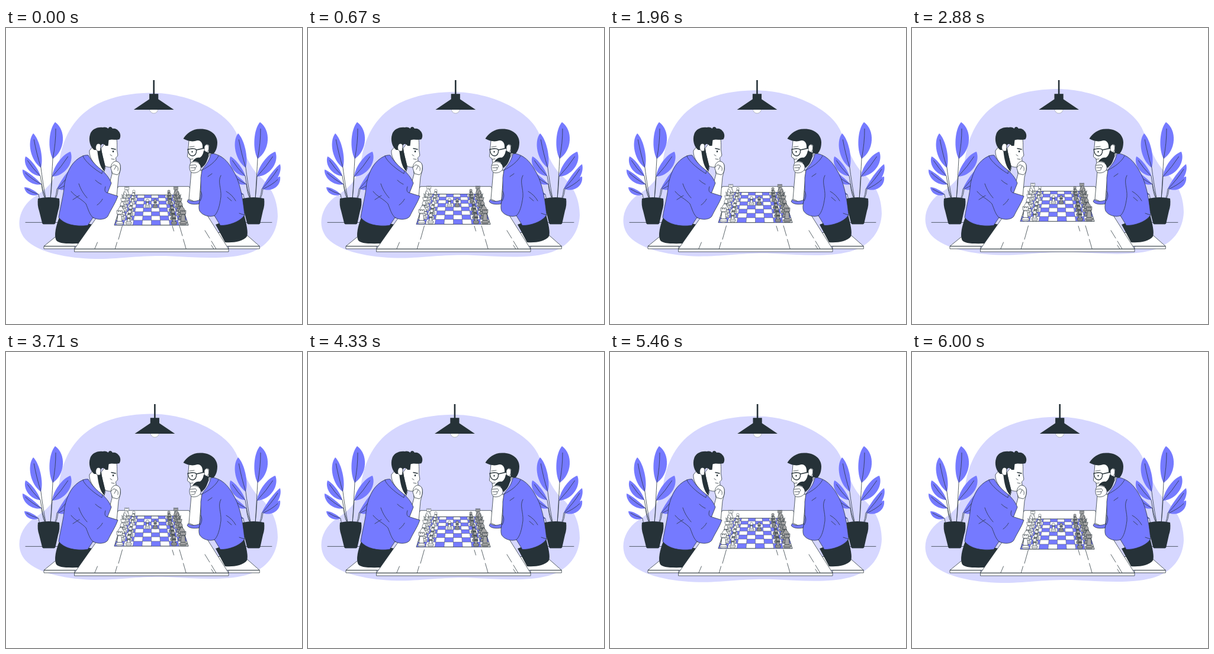
An HTML page for the animation above (6.04 s loop, 500x500 px).

```html
<!DOCTYPE html>
<html lang="en">
<head>
<meta charset="utf-8">
<title>Chess game</title>
<style>
  html, body { margin: 0; width: 100%; height: 100%; overflow: hidden; background: #fff; }
  svg { display: block; width: 100vw; height: 100vh; }
  .line { fill: none; stroke: #263238; stroke-width: .75; stroke-linecap: round; stroke-linejoin: round; }
  .skin { fill: #fff; stroke: #263238; stroke-width: .75; stroke-linejoin: round; }
  .blue { fill: #757aff; stroke: #263238; stroke-width: .75; stroke-linejoin: round; }
  .leaf { fill: #757aff; }
  .dark { fill: #263238; }
  .blob { fill: #d6d7ff; }
  .piece { stroke: #263238; stroke-width: .6; stroke-linejoin: round; }
</style>
</head>
<body>
<svg viewBox="0 0 500 500">
  <path id="blob" class="blob" d="M243 109.5C310 109 372 142 388 175C402 205 408 232 430 252C448 268 459 290 459 318C458 345 442 372 405 382C365 392 320 387 270 385C225 384 195 390 150 390C105 389 55 380 33 357C14 336 22 303 47 286C72 270 84 258 90 225C97 180 118 147 155 128C182 115 212 110 243 109.5Z"/>
  <path class="line" d="M33 328.4H90M400 328.4H449"/>
  <g id="plants"></g>

  <g id="lamp">
    <path d="M242.6 137a7.1 7.1 0 0 0 14.2 0Z" fill="#fff" stroke="#8b9296" stroke-width=".6"/>
    <path class="dark" d="M248.4 88h2.6v23.2h6.3v9L283.6 138H215.8L242.1 120.2v-9h6.3Z"/>
  </g>

  <g id="benches">
    <path class="skin" d="M64 368.6L93 345H150V368.6ZM64 368.6H116V373H64Z"/>
    <path class="skin" d="M428.3 368.6L402 345.5H345V368.6ZM376 368.6H428.3V373H376Z"/>
  </g>
  <path class="dark" d="M90 320C84 335 81 350 84.500 358C88 364 100 364.500 124 364L146 332Z"/>
  <path class="dark" d="M354 332L402 315C406 330 409.500 345 407 352C400 361 384 363 370 362Z"/>

  <path class="skin" d="M190 267.700H309L376 373.300H115.500ZM115.500 373.300H376V378H115.500Z"/>
  <path class="line" d="M196.500 334L190 357M187.500 362L184.500 372.500M154.500 362L150 372.500M281 334.500L283.500 343M293 334L298 351M299.500 357L304 372.500M336 342L344 355M347 360L354.500 372.500M347 367L350.500 372.500"/>

  <g id="left-player">
    <path class="skin" d="M170 280L179 247L178 232C180 226 186 224 190 227C194 230 194 238 192 244L190 252L187 285Z"/>
    <path class="skin" d="M152 194L141 207C140 220 150 232 165 244L168 236Z"/>
    <path class="skin" d="M172 188L187 186.500C188 197 187.500 202 187.500 206L188.800 214C189 217 186.500 218 185.500 219L186 224L184 232C180 236 172 236 167 233L160 204Z"/>
    <path class="dark" d="M154 205L161 203C162 212 165 222 167.500 233L166 242C159 235 156 224 154 205Z"/>
    <path class="dark" d="M149 206C142 201 139 189 142 180C144 172 153 167 163 168C167 166.500 171 168 172.500 170C174 166 178 166 180 170C184 169 188 171 190 174C193.500 177 194.500 184 191.500 188C186 190 179 187 173.500 189.500L172.500 199L168 199C165 194 160 196 160 201L159 206Z"/>
    <path class="skin" d="M152 205C150 196 157 192 160 198L159.500 207C157 209 153 208 152 205Z"/>
    <path class="line" d="M178 203.500L185 205" style="stroke-width:1.500"/>
    <ellipse class="dark" cx="181" cy="208.500" rx="1.200" ry="1.700"/>
    <path class="line" d="M178 221L183 222M176 214L179 216"/>
    <path class="skin" d="M177 237C177 230 181 225 186 225C191 226 194 230 193 237C193 243 191 246 188 248L180 246Z"/>
    <path class="line" d="M178 235C180 231 184 230 186 233L183 239M186 233C189 233 190 237 189 241"/>
    <path class="blue" d="M130 216C112 224 104 240 99 262C97 285 92 300 89 320C98 332 118 336 138 333.500L147 320C155 325 168 324 172 318C178 305 185 296 189 284L171.500 278.500L178 262C174 252 168 246 163 241C154 234 145 226 139 215C136 214.500 133 215 130 216Z"/>
    <path class="line" d="M130 216C131 222 145 236 162 246L163 241M110 276C117 285 128 289 135 297C139 306 141 316 148 321M123 263C126 272 130 279 137 287M113 290L124 283M168 268C166 274 167 278 171.500 278.500M163 289C161 293 158 296 154 299M151 257C154 260 157 262 161 264"/>
  </g>

  <g id="right-player">
    <path class="skin" d="M313 242L309 289L326 297L331 240Z"/>
    <path class="skin" d="M309 190L307.500 207L306.500 217C308 220 310 219 311 221L312 229L331 236L344 214L345 196L325 184Z"/>
    <path class="dark" d="M334 207C333 213 331 217 327 219C322 218 317 222 315 226C320 224 324 226 326 228L325 235C333 238 340 229 343 211Z"/>
    <path class="dark" d="M299.500 187C305 178 315 170 329 170.500C346 170.500 357 181 357 193C357 203 354 209 350 213L342 211L343 199C340 194 336 197 334.500 203L332 203C333 195 329 189 323 190C315 193 307 191 299.500 187Z"/>
    <path class="skin" d="M336 208C333 202 336 196 340 197C344 199 343 208 339 210Z"/>
    <path class="line" d="M307 205L310 204.500C315 203 321 204 321.500 206C322 211 320 216 315 216C310 216 308 212 307 205ZM321.500 206L335 203" style="stroke-width:1.300"/>
    <ellipse class="dark" cx="314.500" cy="209" rx="1.100" ry="1.600"/>
    <path class="line" d="M310 201L318 200M311 222L316 221"/>
    <path class="skin" d="M311 230C312 226 318 225 323 227C328 229 331 235 328 240C325 244 318 246 313 244C310 241 309 234 311 230Z"/>
    <path class="line" d="M311 232L320 231C323 233 322 236 319 236L312 236M319 236C321 239 319 241 313 241"/>
    <path class="blue" d="M308 289.500C310 293 320 294 328 290L326 297C319 298.500 309 298 306 293Z"/>
    <path class="blue" d="M350 212C364 215 374 224 382 238C395 258 400 285 403 316C395 328 375 334 362 333.500L352 317C344 320 332 317 327 309C324 301 328 291 329 280L329 253L331 240C336 232 343 227 346 213Z"/>
    <path class="line" d="M331 240C343 234 354 226 359 216M363 249C357 260 364 270 363 285C361 300 358 312 352 317M372 276C379 280 384 285 388 292M374 286L381 292M329 276C332 281 331 287 328 292M394 313C397 314 400 315 403 316M341 251L348 246"/>
  </g>

  <g id="chess"></g>
</svg>
<script>
const NS = 'http://www.w3.org/2000/svg';
const $ = id => document.getElementById(id);

function add(parent, tag, attrs) {
  const el = document.createElementNS(NS, tag);
  for (const key in attrs) el.setAttribute(key, attrs[key]);
  return parent.appendChild(el);
}

// Each leaf: base x, y, tip x, y, half width, bend.
const leaves = [
  [79, 221, 83, 159, 12, 5], [59, 236, 46, 178, 9, -3],
  [58, 250, 33, 217, 7, -4], [60, 264, 28, 239, 6, -5],
  [55, 281, 31, 269, 5, -3], [78, 251, 109, 209, 10, 4],
  [86, 272, 117, 230, 7, 5], [88, 272, 117, 251, 7, 5]
];

function drawPlant(shift) {
  const g = add($('plants'), 'g', { transform: `translate(${shift})` });
  leaves.forEach(([x, y, tx, ty, half, bend], i) => {
    const len = Math.hypot(tx - x, ty - y);
    const dx = (tx - x) / len, dy = (ty - y) / len;
    const at = (along, side) => `${x + dx * len * along - dy * side} ${y + dy * len * along + dx * side}`;
    const edge = s => [at(.25, s * half * 1.25 + bend), at(.8, s * half * 1.25 + bend)];
    const [a, b] = edge(1), [c, d] = edge(-1);
    add(g, 'path', { class: 'leaf', d: `M${x} ${y}C${a} ${b} ${tx} ${ty}C${d} ${c} ${x} ${y}Z` });
    const root = 66 + (x - 55) * .38;
    add(g, 'path', { class: 'line', d: `M${root} 290Q${x + (root - x) * .3} ${y + 22} ${x} ${y}Q${at(.45, bend * .7)} ${at(.82, bend * .35)}` });
  });
  add(g, 'path', { class: 'dark', d: 'M54 288Q72 284 90 288Q91.500 299 88 309L83.500 329Q83 331.600 80 331.600H64.500Q61.500 331.600 61 329L56 309Q52.500 299 54 288Z' });
}

// Board point for a column and row counted from the near left corner.
function spot(u, v) {
  const depth = 1 / (1 + .043 * v);
  return [245.5 + (u - 4) * 15.6 * depth, 134 + 199 * depth, depth];
}

function quad(u, v, n) {
  return 'M' + [[u, v], [u + n, v], [u + n, v + n], [u, v + n]]
    .map(p => spot(...p).slice(0, 2).join(' ')).join('L') + 'Z';
}

const bodies = {
  pawn: 'M-3 -2C-1 -5 -2 -7 -2 -8H2C2 -7 1 -5 3 -2ZM-3 -8.500H3V-7.300H-3Z M-2.700 -11.500a2.700 2.700 0 1 0 5.400 0a2.700 2.700 0 1 0 -5.400 0Z',
  rook: 'M-4 -3L-2.800 -14H2.800L4 -3ZM-4.300 -15H4.300L4.600 -21H2.300V-19H1V-21H-1V-19H-2.300V-21H-4.600Z',
  knight: 'M-4.500 -3C-3 -8 -1 -9 -1 -12L-5 -10L-6 -13L-2 -19L-1 -22L1 -20C6 -17 6 -9 4.500 -3Z',
  bishop: 'M-4 -3C-1 -8 -2 -11 -2 -13H2C2 -11 1 -8 4 -3ZM-3.500 -14.500H3.500V-13H-3.500ZM-2 -14.500C-5 -18 -1 -21 0 -23C1 -21 5 -18 2 -14.500Z',
  queen: 'M-4 -3C-1 -9 -2 -13 -2 -16H2C2 -13 1 -9 4 -3ZM-3 -16H3L4.600 -23L2 -21L0 -24L-2 -21L-4.600 -23Z',
  king: 'M-4 -3C-1 -9 -2 -13 -2 -16H2C2 -13 1 -9 4 -3ZM-3 -16H3L4.500 -22H-4.500ZM-.7 -22V-24H-2V-25.300H-.7V-27H.7V-25.300H2V-24H.7V-22Z'
};
const rank = ['rook', 'knight', 'bishop', 'king', 'queen', 'bishop', 'knight', 'rook'];

function drawPiece(kind, u, v) {
  const white = u < 4;
  const [x, y, depth] = spot(u + .5, v + .4);
  const size = depth * 1.04;
  const g = add($('chess'), 'g', {
    class: 'piece', fill: white ? '#fff' : '#a6a6a6',
    transform: `translate(${x} ${y}) scale(${white ? -size : size} ${size})`
  });
  const w = kind === 'pawn' ? 4.5 : 6;
  add(g, 'path', { d: `M${-w} -1V1C${-w} 3.500 ${w} 3.500 ${w} 1V-1Z` });
  add(g, 'ellipse', { cy: -1.2, rx: w, ry: 2 });
  add(g, 'path', { d: bodies[kind] });
}

function drawChess() {
  const g = $('chess');
  add(g, 'path', { class: 'skin', d: quad(0, 0, 8) });
  for (let v = 0; v < 8; v++)
    for (let u = 0; u < 8; u++)
      if ((u + v) % 2 === 0) add(g, 'path', { class: 'leaf', d: quad(u, v, 1) });
  for (let i = 0; i <= 8; i++) {
    const [a, b, c, d] = [spot(i, 0), spot(i, 8), spot(0, i), spot(8, i)];
    add(g, 'path', { class: 'line', style: 'stroke-width:.4', d: `M${a[0]} ${a[1]}L${b[0]} ${b[1]}M${c[0]} ${c[1]}L${d[0]} ${d[1]}` });
  }
  for (let v = 7; v >= 0; v--) {
    const advanced = v === 4;
    drawPiece(rank[v], 0, v);
    drawPiece('pawn', advanced ? 3 : 1, v);
    drawPiece('pawn', advanced ? 4 : 6, v);
    drawPiece(rank[v], 7, v);
  }
}

drawPlant(0);
drawPlant(346);
drawChess();

const LOOP = 6040, CYCLE = 6000, UNIT = 2 / 3;
// Sideways lamp offsets at every tenth of the cycle.
const sway = [0, -1, 2, -4, 4, -4, 4, -4, 2, -1, 0];

function frame() {
  const p = Math.min(1, performance.now() % LOOP / CYCLE);
  const lift = -10 * UNIT * (1 - Math.abs(1 - 2 * p));
  const i = Math.min(9, Math.floor(p * 10));
  const x = UNIT * (sway[i] + (sway[i + 1] - sway[i]) * (p * 10 - i));
  for (const id of ['blob', 'chess']) $(id).setAttribute('transform', `translate(0 ${lift})`);
  $('lamp').setAttribute('transform', `translate(${x} 0)`);
  requestAnimationFrame(frame);
}
frame();
</script>
</body>
</html>
```
